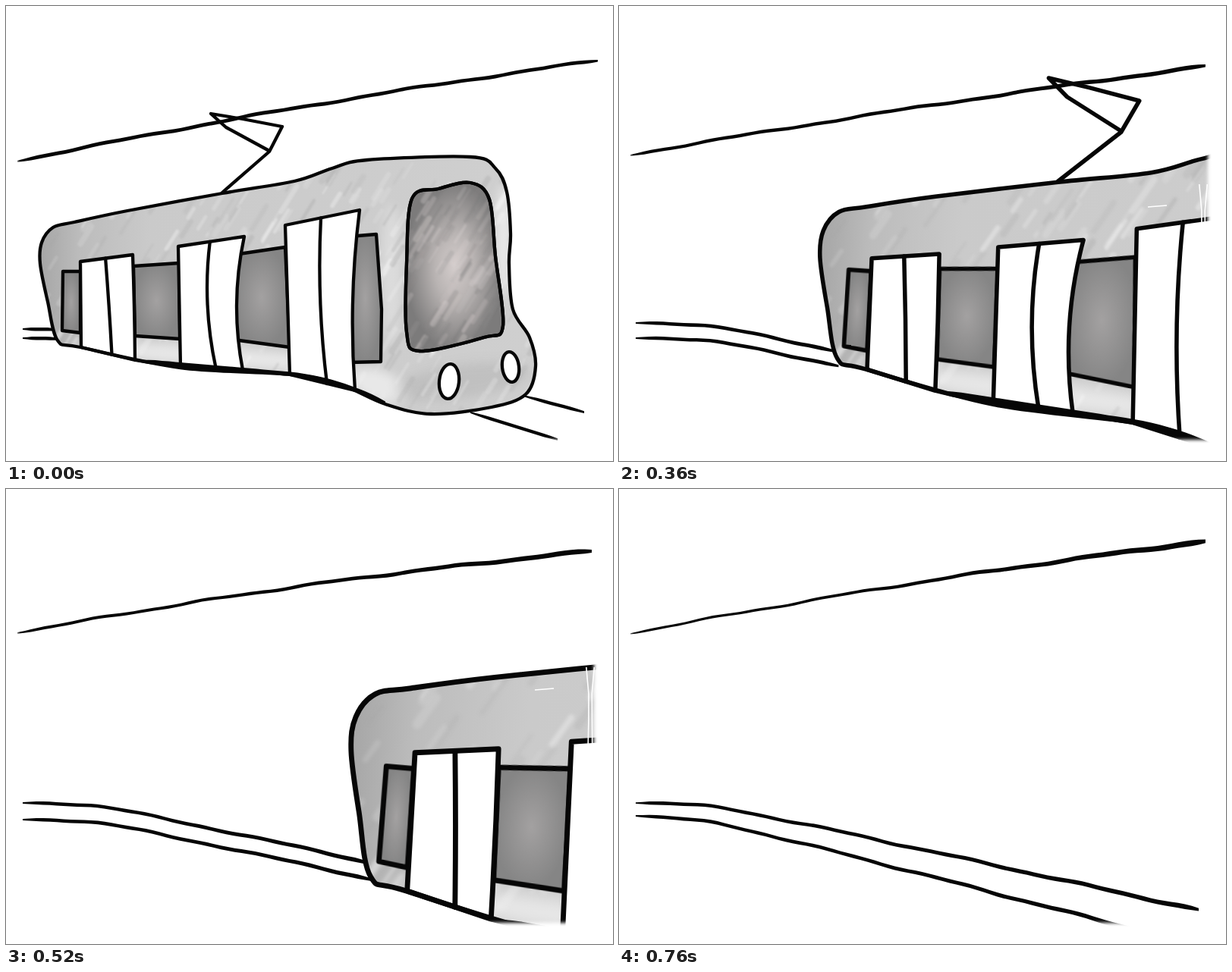
Write an HTML page that moves like this. It is 800 px wide and 600 px high and loops after 0.96 s.

```html
<!DOCTYPE html>
<html lang="en">
<head>
<meta charset="utf-8">
<title>Passing tram</title>
<style>
html, body { margin: 0; width: 100%; height: 100%; overflow: hidden; background: #fff; }
svg { display: block; width: 100vw; height: 100vh; }
.ink { fill: none; stroke: #060606; stroke-width: 4.3; stroke-linejoin: round; stroke-linecap: round; }
.ribbon { fill: #060606; }
</style>
</head>
<body>
<svg viewBox="0 0 800 600">
  <defs>
    <linearGradient id="paint" gradientUnits="userSpaceOnUse" x1="45" y1="0" x2="700" y2="0">
      <stop offset="0" stop-color="#a6a6a6"/><stop offset=".08" stop-color="#bcbcbc"/>
      <stop offset=".22" stop-color="#cacaca"/><stop offset="1" stop-color="#cfcfcf"/>
    </linearGradient>
    <radialGradient id="glass">
      <stop offset="0" stop-color="#d3cccb"/><stop offset=".4" stop-color="#b9b4b3"/><stop offset="1" stop-color="#7c7b7b"/>
    </radialGradient>
    <radialGradient id="pane"><stop offset="0" stop-color="#a3a1a1"/><stop offset="1" stop-color="#858585"/></radialGradient>
    <filter id="soft" x="-10%" y="-10%" width="120%" height="120%"><feGaussianBlur stdDeviation="1.3"/></filter>
    <filter id="cloud" x="-20%" y="-20%" width="140%" height="140%"><feGaussianBlur stdDeviation="7"/></filter>
    <filter id="edge" filterUnits="userSpaceOnUse" x="-20" y="-20" width="840" height="640"><feGaussianBlur stdDeviation="2"/></filter>
    <mask id="paper" maskUnits="userSpaceOnUse" x="0" y="0" width="800" height="600">
      <rect id="sheet" x="15" y="55" height="517" fill="#fff" filter="url(#edge)"/>
    </mask>
    <clipPath id="bodyClip"><path id="bodyShape"/></clipPath>
    <clipPath id="glassClip"><path id="glassShape"/></clipPath>
  </defs>
  <rect width="800" height="600" fill="#fff"/>
  <g mask="url(#paper)">
    <g id="lines"></g>
    <g id="tram"></g>
    <path id="scratch" fill="none" stroke="#fff" stroke-width="1.6"/>
  </g>
</svg>
<script>
const $ = id => document.getElementById(id);
const points = text => text.split(' ').map(p => p.split(',').map(Number));
const mix = (a, b, u) => a + (b - a) * u;
const mixAll = (p, q, u) => p.map((v, i) => mix(v, q[i], u));
const fmt = p => p.map(v => v.toFixed(1)).join(' ');
const random = seed => (lo, hi) => {
  seed = (seed * 16807) % 2147483647;
  return mix(lo, hi, seed / 2147483647);
};
const rnd = random(4711);

const polyline = (pts, close) => 'M' + pts.map(fmt).join('L') + (close ? 'Z' : '');

// Smooth closed curve through the points
function loop(pts) {
  const at = i => pts[(i + pts.length) % pts.length];
  return 'M' + fmt(pts[0]) + pts.map((b, i) => {
    const a = at(i - 1), c = at(i + 1), e = at(i + 2);
    return 'C' + fmt(b.map((v, k) => v + (c[k] - a[k]) / 6)) + ' ' +
      fmt(c.map((v, k) => v - (e[k] - b[k]) / 6)) + ' ' + fmt(c);
  }).join('') + 'Z';
}

// Brush stroke along y(x), its width growing from w0 to w1, with pointed tips
function ribbon(x0, x1, y, w0, w1) {
  const n = Math.max(8, Math.round((x1 - x0) / 9)), up = [], down = [];
  for (let i = 0; i <= n; i++) {
    const u = i / n, x = mix(x0, x1, u);
    const tip = Math.min(1, .4 + i / 4, .6 + (n - i) / 4);
    const half = mix(w0, w1, u * u) * tip / 2;
    up.push([x, y(x) - half]);
    down.unshift([x, y(x) + half]);
  }
  return `<path class="ribbon" d="${polyline(up.concat(down), true)}"/>`;
}

// ---- tram ----
const body = points('47,312 62,292 90,285 160,270 285,247 380,231 430,214 476,203 612,199 645,214 660,245 665,300 663,340 668,400 690,437 698,475 685,512 640,529 560,538 500,525 440,499 376,486 230,477 98,450 68,441 55,390 45,340');
const shield = points('535,254 570,241 612,233 637,255 645,330 655,422 630,437 545,455 528,430 528,340');
const panes = [
  '75,350 98,350 98,431 74,428',
  '168,343 228,339 229,439 170,435',
  '300,328 368,318 374,450 300,440',
  '452,304 488,301 495,400 494,469 452,470'
];
// Corners clockwise from top left, then how far the inner edges bow
const doors = [
  ['98,337 167,328 170,467 99,450', .5],
  ['227,317 314,304 312,480 230,475', -9],
  ['368,289 466,269 460,507 374,486', -6]
];
const arm = points('285,246 347,192 364,159 312,149 270,142 290,160 347,191');

const shape = (d, fill = 'none') => `<path class="ink" d="${d}" style="fill:${fill}"/>`;
const oval = (x, y, rx, ry, turn, look) =>
  `<ellipse rx="${rx}" ry="${ry}" transform="translate(${x} ${y}) rotate(${turn})" ${look}/>`;

// Soft diagonal brush marks inside a box
function marks(count, x0, y0, x1, y1, tones) {
  let out = '';
  for (let i = 0; i < count; i++) {
    const from = [rnd(x0, x1), rnd(y0, y1)], len = rnd(12, 42);
    out += `<path d="M${fmt(from)}l${fmt([len * .5, -len * .8])}" stroke="${tones[i % tones.length]}" ` +
      `stroke-width="${rnd(2, 8).toFixed(1)}" opacity="${rnd(.1, .34).toFixed(2)}"/>`;
  }
  return `<g fill="none" stroke-linecap="round" filter="url(#soft)">${out}</g>`;
}

function door([corners, bow]) {
  const [tl, tr, br, bl] = points(corners);
  const side = (a, b, bend) => {
    const [x, y] = mixAll(a, b, .5);
    return `M${fmt(a)}Q${fmt([x + bend * 2, y])} ${fmt(b)}`;
  };
  const frame = side(tr, br, bow) + 'L' + fmt(bl) + 'L' + fmt(tl) + 'Z';
  return shape(frame, '#fff') + shape(side(mixAll(tl, tr, .48), mixAll(bl, br, .57), bow * .8));
}

function buildTram() {
  const hull = loop(body), front = loop(shield);
  $('bodyShape').setAttribute('d', hull);
  $('glassShape').setAttribute('d', front);
  const light = 'fill="#fff" opacity=".55"';
  const shade = oval(270, 462, 190, 13, 4, light) + oval(490, 500, 38, 20, 20, light) +
    oval(656, 310, 10, 75, 0, light) + oval(508, 350, 13, 90, 0, 'fill="#fff" opacity=".3"') +
    oval(600, 495, 90, 22, -8, 'fill="#999" opacity=".25"');
  let out = `<g clip-path="url(#bodyClip)"><rect x="30" y="190" width="690" height="360" fill="url(#paint)"/>` +
    `<g filter="url(#cloud)">${shade}</g>` +
    marks(330, 40, 220, 690, 550, ['#fff', '#a4a4a4', '#efefef']) + '</g>';
  out += panes.map(p => shape(polyline(points(p), true), 'url(#pane)')).join('');
  out += shape(front, 'url(#glass)') + '<g clip-path="url(#glassClip)">' +
    marks(110, 515, 250, 655, 480, ['#e2dbda', '#777', '#c9c2c1', '#8b8888']) + '</g>' + shape(front);
  out += doors.map(door).join('');
  const lamp = 'class="ink" style="fill:#fff"';
  out += oval(584, 495, 13, 23, 6, lamp) + oval(665, 476, 11, 20, -7, lamp);
  out += shape(hull) + shape(polyline(arm));
  // Heavy sill and the rails in front
  const sill = x => 467 + .085 * (x - 160) + .0016 * Math.max(0, x - 370) ** 2;
  out += ribbon(170, 500, sill, 6, 5);
  out += ribbon(682, 762, x => 514 + .27 * (x - 682), 4.5, 4.5) +
    ribbon(612, 727, x => 536 + .31 * (x - 612), 4.5, 4.5);
  $('tram').innerHTML = out;
}

function buildScratch() {
  const streak = x => {
    const pts = [];
    for (let y = 235; y < 575; y += 35) pts.push([x + rnd(-2.5, 2.5), y]);
    return polyline(pts);
  };
  $('scratch').setAttribute('d', streak(767) + streak(773) + 'M697 265L722 263');
}

// ---- motion ----
// pose: matrix of the tram; wire: left y, sag, right y; rail: left y, gap at left and right
const keys = {
  0: { pose: [1, 0, 0, 1, 0, 0], wire: [204, -6, 72], rail: [423, 12, 12], edge: [783] },
  1: { pose: [1.053, .039, -.034, 1.04, 74, -27], wire: [203, 2, 73], rail: [421, 15, 15], edge: [765] },
  2: { pose: [1.129, .054, -.05, 1.118, 149, -56], wire: [204, 0, 73], rail: [419, 20, 14], edge: [778] },
  4: { pose: [1.435, .117, -.081, 1.472, 310, -168], wire: [188, -8, 86], rail: [411, 20, 20], edge: [774] },
  6: { pose: [1.73, .157, -.13, 1.75, 529, -249], wire: [190, -8, 78], rail: [411, 24, 22], edge: [776] },
  8: { pose: [2.03, .2, -.18, 2.03, 770, -332], wire: [190, -6, 69], rail: [411, 17, 41], edge: [776] }
};

function value(step, part) {
  return step in keys ? keys[step][part] : mixAll(keys[step - 1][part], keys[step + 1][part], .5);
}

// Slow waver of a hand-drawn line, different in every step
function waver(step, salt) {
  const r = random(97 + step * 31 + salt), phase = r(0, 6), wave = r(24, 34);
  return x => .9 * Math.sin(x / wave + phase) + .4 * Math.sin(x / 11 + phase);
}

function drawLines(step) {
  const [left, sag, right] = value(step, 'wire');
  const [base, gap0, gap1] = value(step, 'rail');
  const pose = value(step, 'pose'), edge = value(step, 'edge')[0];
  const end = Math.min(764, pose[0] * 66 + pose[2] * 438 + pose[4]);
  const [w1, w2, w3] = [1, 2, 3].map(salt => waver(step, salt * 7));
  const wire = x => {
    const u = (x - 15) / (edge - 20);
    return mix(left, right, u) + sag * Math.sin(Math.PI * u) + w1(x);
  };
  // Level at first, then a steady slope
  const bend = x => base + .11 * (x - 110 + Math.hypot(x - 110, 60));
  const far = x => bend(x) + w2(x);
  const near = x => bend(x) + mix(gap0, gap1, (x - 25) / 575) + w3(x);
  const grow = step / 8;
  $('lines').innerHTML = ribbon(15, edge - 3, wire, mix(5, 3.2, grow), mix(4.6, 8, grow)) +
    ribbon(22, end, far, 4.5, mix(4.5, 6.5, grow)) + ribbon(22, end + 4, near, 4.5, mix(4.5, 6.5, grow));
  $('sheet').setAttribute('width', edge - 15);
}

function draw(step) {
  drawLines(step);
  $('tram').setAttribute('transform', `matrix(${value(step, 'pose').join(' ')})`);
  $('tram').style.display = step < 8 ? '' : 'none';
  $('scratch').style.display = step > 0 && step < 8 ? '' : 'none';
}

let shown = -1;
function tick() {
  const t = performance.now() % 960;
  const step = t < 200 ? 0 : Math.min(8, 1 + Math.floor((t - 200) / 80));
  if (step !== shown) draw(shown = step);
  requestAnimationFrame(tick);
}
buildTram();
buildScratch();
tick();
</script>
</body>
</html>
```
